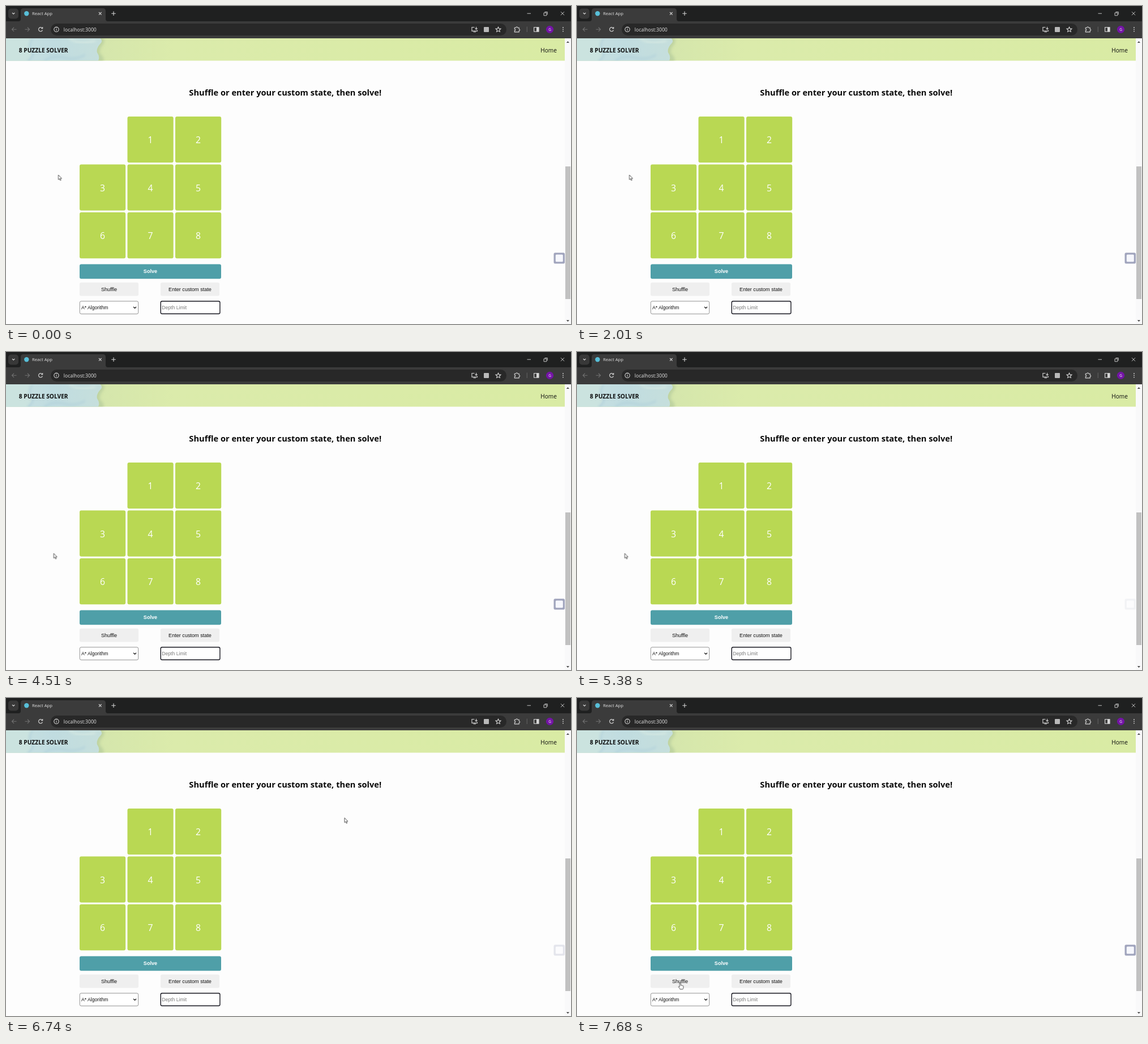
Animation of 998x561 px, one loop 8 s. Source, as an HTML page:

```html
<!DOCTYPE html>
<html lang="en">
<head>
<meta charset="utf-8">
<title>8 Puzzle Solver</title>
<style>
  html, body { margin: 0; width: 100%; height: 100%; overflow: hidden; background: #fdfdfd; }
  svg { display: block; width: 100vw; height: 100vh; }
  text { font-family: "Open Sans", "Noto Sans", sans-serif; }
  .form text { font-family: "Liberation Sans", Arial, sans-serif; font-size: 9.1px; }
  .mid { text-anchor: middle; }
  .bold { font-weight: 700; }
  .line { fill: none; stroke: #d6d6d6; stroke-width: 1.1; }
  .dim { stroke: #727272; }

  .pointer { animation: travel 8s linear infinite; }
  .arrow { animation: arrow 8s step-end infinite; }
  .hand { animation: hand 8s step-end infinite; }
  .widget { animation: fade 8s linear infinite; }

  @keyframes travel {
    0% { transform: translate(92.5px, 298px); animation-timing-function: step-end; }
    43% { transform: translate(88px, 328px); animation-timing-function: step-end; }
    43.375% { transform: translate(84.3px, 355.3px); }
    78.875% { transform: translate(84.3px, 355.3px); animation-timing-function: ease-in-out; }
    84.25% { transform: translate(598px, 211.3px); animation-timing-function: ease-in-out; }
    86.75%, 100% { transform: translate(182.3px, 502px); }
  }
  @keyframes arrow { 0% { opacity: 1; } 86.4%, 100% { opacity: 0; } }
  @keyframes hand { 0% { opacity: 0; } 86.4%, 100% { opacity: 1; } }
  @keyframes fade {
    0%, 63% { opacity: 1; }
    67.6%, 83.5% { opacity: .04; }
    86.75%, 100% { opacity: 1; }
  }
</style>
</head>
<body>
<svg viewBox="0 0 998 561" preserveAspectRatio="none">
  <defs>
    <linearGradient id="meadow">
      <stop offset="0" stop-color="#cbe3cf"/>
      <stop offset=".17" stop-color="#d5e6ac"/>
      <stop offset=".3" stop-color="#dbebab"/>
      <stop offset="1" stop-color="#d9eba4"/>
    </linearGradient>
    <linearGradient id="sky">
      <stop offset="0" stop-color="#c9e1e2"/>
      <stop offset=".5" stop-color="#c0dce0"/>
      <stop offset="1" stop-color="#c6dfdc"/>
    </linearGradient>
    <filter id="soft"><feGaussianBlur stdDeviation="2"/></filter>
    <clipPath id="bar"><rect y="57" width="987" height="39.5"/></clipPath>
  </defs>

  <!-- Browser window -->
  <rect width="998" height="30" fill="#1f2020"/>
  <rect y="27" width="998" height="30" fill="#3b3b3b"/>
  <path d="M22 27q4 0 4-4V9q0-5 5-5h140q5 0 5 5v14q0 4 4 4z" fill="#3b3b3b"/>
  <rect x="4" y="4.5" width="18" height="18" rx="5" fill="#383838"/>
  <rect x="79" y="31" width="805" height="21" rx="10.5" fill="#282828"/>
  <circle cx="36.3" cy="13.3" r="4.2" fill="#58bfd8"/>
  <g fill="#e4e4e4">
    <text x="46" y="16.2" font-size="7.7">React App</text>
    <text x="101.8" y="44.5" font-size="8.6">localhost:3000</text>
  </g>
  <g class="line">
    <path d="M11 12l2.2 2.2 2.2-2.2M164 11l4.6 4.6m0-4.6l-4.6 4.6M186.2 13.2h7.6M190 9.4v7.6"/>
    <path d="M920.5 13.2h6.5M951.5 10.5h4.8v4.8M950 12h4.8v4.8h-4.8zM980 10.2l6 6m0-6l-6 6" stroke-width=".9"/>
    <path class="dim" d="M18.5 41.3h-8m3.6-3.6l-3.6 3.6 3.6 3.6M33.5 41.3h8m-3.6-3.6l3.6 3.6-3.6 3.6"/>
    <path d="M64 39a3.6 3.6 0 1 0 .5 3.5M64.7 37v2.7H62"/>
    <circle cx="89" cy="41.3" r="4.2"/>
    <path d="M89 40.6v3M89 38.6v1"/>
    <path d="M827.5 37.5h-4.6v6.6h9.6v-1.6M825.5 45.7h4.5M830.6 36.7v4.6m-2-2l2 2 2-2"/>
    <path d="M869.5 37l1.3 2.9 3.2.3-2.4 2.1.7 3.1-2.8-1.6-2.8 1.6.7-3.1-2.4-2.1 3.2-.3z"/>
    <path d="M898.3 38.3h2.5q0-1.5 1.4-1.5t1.4 1.5h2.6v2.5q1.4 0 1.4 1.4t-1.4 1.4v2.3h-7.9v-2.5q1.6 0 1.6-1.3t-1.6-1.3z"/>
    <path d="M920.3 36.5v9.5" stroke="#606060"/>
    <rect x="932.6" y="37.7" width="8.4" height="7.4"/>
  </g>
  <path d="M937 37.5h4.2v7.8H937z" fill="#d6d6d6"/>
  <rect x="844" y="37" width="9" height="9" rx="1" fill="#b9b9b9"/>
  <circle cx="960.5" cy="41.3" r="6.6" fill="#7314a5"/>
  <text class="mid" x="960.5" y="43.6" font-size="6.4" fill="#fff">G</text>
  <g fill="#d6d6d6">
    <circle cx="984" cy="38" r=".9"/><circle cx="984" cy="41.3" r=".9"/><circle cx="984" cy="44.6" r=".9"/>
  </g>

  <!-- Site header -->
  <g clip-path="url(#bar)">
    <rect y="57" width="987" height="40" fill="url(#meadow)"/>
    <path d="M0 52H165Q178 60 171 68T166 84Q178 94 168 102H0z" fill="#b7cd9c" opacity=".75" filter="url(#soft)"/>
    <path d="M0 52H157Q173 58 168 65Q159 74 161 82Q168 92 160 101H0z" fill="url(#sky)"/>
    <path d="M0 57H46Q39 70 44 78T38 97H0z" fill="#cbe3df"/>
    <path d="M46 57Q38 71 45 79T38 97M68 97Q80 86 102 91T140 86" fill="none" stroke="#b0d0da" stroke-width="2.5" filter="url(#soft)"/>
    <path d="M112 57Q130 70 158 61" fill="none" stroke="#d3e7e2" stroke-width="4" filter="url(#soft)"/>
  </g>
  <text class="bold" x="22.8" y="81.6" font-size="10.2" fill="#0c0c0c">8 PUZZLE SOLVER</text>
  <text x="944.3" y="81.8" font-size="10.1" font-weight="500" fill="#0c0c0c">Home</text>

  <!-- Scrollbar -->
  <rect x="987" y="57" width="11" height="504" fill="#f9f9fa"/>
  <rect x="988" y="283" width="9" height="234" fill="#c1c1c1"/>
  <path d="M989.8 65l2.6-3 2.6 3zM989.8 554l2.6 3 2.6-3z" fill="#505050"/>

  <text class="mid bold" x="493.3" y="158" font-size="14.65" fill="#090909">Shuffle or enter your custom state, then solve!</text>
  <g id="board"></g>

  <g class="form" fill="#111">
    <rect x="130" y="455.5" width="250" height="25.8" rx="3" fill="#4f9fa8"/>
    <text class="mid bold" x="255" y="471.1" fill="#fff">Solve</text>
    <rect x="130" y="487.8" width="104" height="23.6" rx="3" fill="#efefef"/>
    <text class="mid" x="182" y="502.6">Shuffle</text>
    <rect x="273" y="487.8" width="104" height="23.6" rx="3" fill="#efefef"/>
    <text class="mid" x="325" y="502.6">Enter custom state</text>
    <rect x="130.3" y="520.8" width="103.4" height="22.4" rx="2.6" fill="#fff" stroke="#777" stroke-width=".8"/>
    <text x="133" y="534.8" style="font-size:8.65px">A* Algorithm</text>
    <path d="M225.2 530.8l2.4 2.4 2.4-2.4" fill="none" stroke="#111" stroke-width="1.3"/>
    <rect x="273.3" y="520.8" width="104.6" height="22.2" rx="2.6" fill="#fff" stroke="#16161f" stroke-width="1.4"/>
    <text x="275.2" y="534.8" style="font-size:8.7px" fill="#797979">Depth Limit</text>
  </g>

  <g class="widget">
    <rect x="967.5" y="435.3" width="19.5" height="19.2" rx="2.5" fill="#a1a5bd"/>
    <rect x="970.8" y="438.6" width="13" height="12.6" rx="1.5" fill="#f6f7fd"/>
  </g>

  <g class="pointer" stroke="#2b2b2b" stroke-width=".8" stroke-linejoin="round" fill="#fff">
    <path class="arrow" d="M0 0v8.4l1.9-1.7 1.4 3.1 1.3-.6-1.3-3h2.6z"/>
    <path class="hand" d="M-1 1Q0-.8 1 1V5Q2.2 4.2 2.8 5.2 4 4.6 4.4 5.7 5.6 5.4 5.6 6.6V9Q5.6 10.5 4.6 11.8H-.3Q-1 10-3 7.6-2.8 6.2-1 7.4z"/>
  </g>
</svg>
<script>
  const PITCH = 84.5, SIZE = 81.2;
  let tiles = '';
  for (let n = 1; n <= 8; n++) {
    const x = 130 + n % 3 * PITCH;
    const y = 195 + Math.floor(n / 3) * PITCH;
    tiles += `<rect x="${x}" y="${y}" width="${SIZE}" height="${SIZE}" rx="3" fill="#b9d853"/>
      <text class="mid" x="${x + SIZE / 2}" y="${y + 47.2}" font-size="15.8" fill="#fff">${n}</text>`;
  }
  document.getElementById('board').innerHTML = tiles;
</script>
</body>
</html>
```
